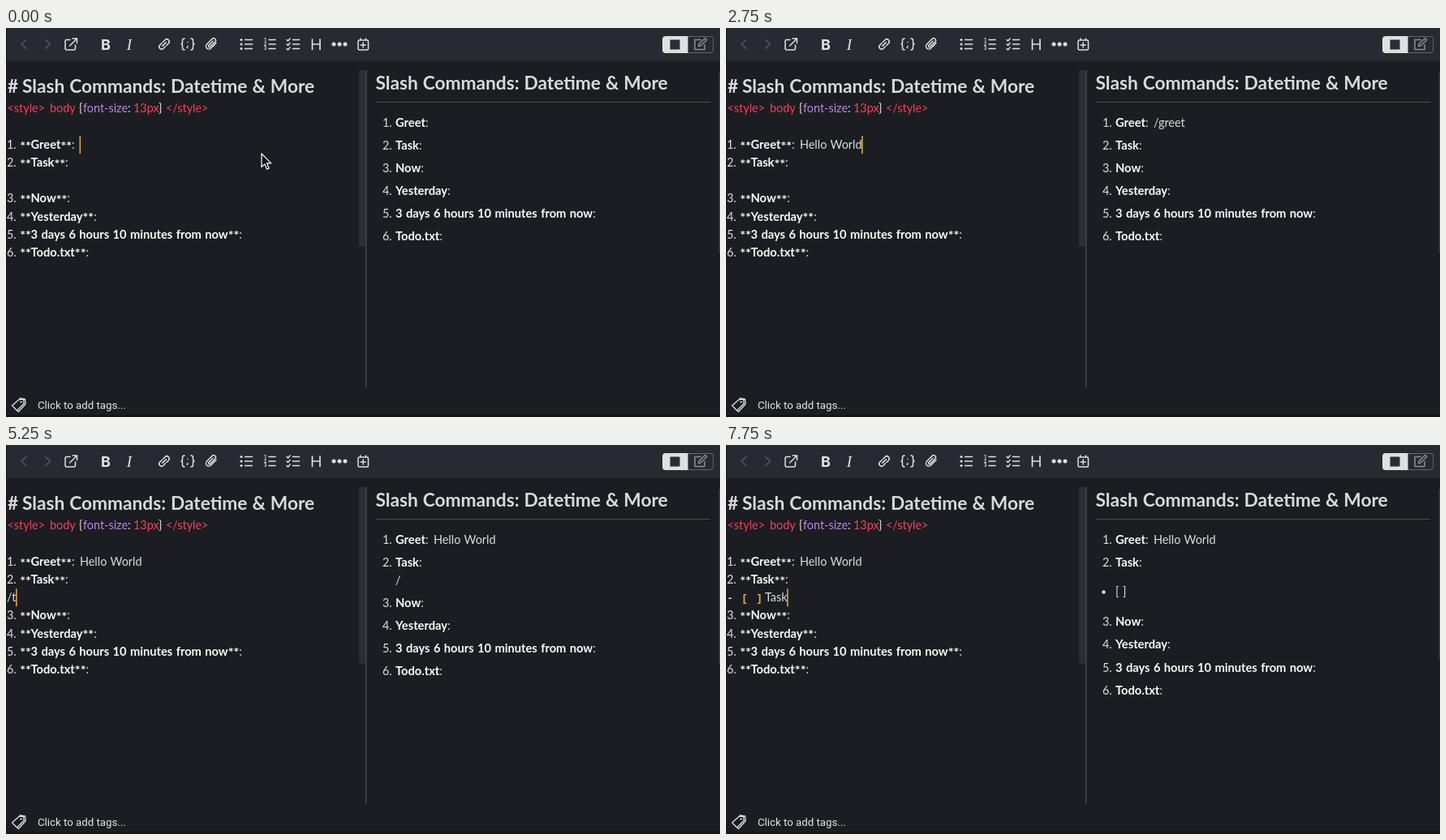
Recreate the animation shown at these times as an HTML page. Size 880 by 480 pixels, loop 8000 ms.

```html
<!DOCTYPE html>
<html lang="en">
<head>
<meta charset="utf-8">
<title>Slash commands</title>
<style>
  html, body { margin: 0; width: 100%; height: 100%; overflow: hidden; background: #1c1d22; }
  svg { display: block; width: 880px; height: 480px; }
  text { font: 14.4px Lato, sans-serif; fill: #dcdde0; word-spacing: .8px; white-space: pre; }
  .b { font-size: 14.7px; font-weight: 700; fill: #fafafb; }
  .star { font-size: 16px; }
  .h { font-size: 22.7px; font-weight: 700; fill: #d9dadc; word-spacing: .5px; }
  .red { fill: #f43f5e; }
  .purple { fill: #b48be0; }
  .mono { font: 700 16px "Liberation Mono", monospace; word-spacing: 0; }
  .small { font-size: 12.5px; letter-spacing: 1.5px; }
  .amber { fill: #eab04c; }
  .ui { font: 13.25px Roboto, sans-serif; fill: #e6e6e8; word-spacing: 0; }
  .icons { fill: none; stroke: #dfe0e2; stroke-width: 1.5; stroke-linecap: round; stroke-linejoin: round; }
  .icons text { fill: #e4e5e7; stroke: none; text-anchor: middle; }
  .solid { fill: #dfe0e2; stroke: none; }
</style>
</head>
<body>
<svg viewBox="0 0 880 480">
  <rect width="880" height="480" fill="#1c1d22"/>
  <rect width="880" height="41" fill="#272a30"/>
  <rect y="477" width="880" height="3" fill="#181319"/>
  <rect width="1" height="480" fill="#17151b"/>
  <rect x="435" y="52" width="8" height="218" rx="2" fill="#2d2e33"/>
  <path d="M443.8 52V443" stroke="#4c4d51" stroke-width="1.3"/>
  <path d="M456 91.5H868" stroke="#4a4b4f"/>
  <rect id="bar" x="878.5" y="55" width="1.5" fill="#36373c"/>

  <g class="icons">
    <path stroke="#54575d" d="M25 14.5l-6 5.5 6 5.5M48.5 14.5l6 5.5-6 5.5"/>
    <path d="M79 14.5h-4q-2 0-2 2v8.500q0 2 2 2h8.500q2 0 2-2v-4M82 13h5.500v5.500M87 13.500l-8.500 8.500"/>
    <text x="123" y="26.5" style="font:700 18px Inter,sans-serif">B</text>
    <text x="152" y="26.5" style="font:italic 19px 'Liberation Serif',serif">I</text>
    <path transform="translate(195 20) rotate(-45)" d="M-1 3h-3.500a3 3 0 0 1 0-6h3.500M1-3h3.500a3 3 0 0 1 0 6h-3.500M-3 0h6"/>
    <path d="M220 13q-2.500 0-2.500 2.500v2q0 2.500-1.500 2.500 1.500 0 1.500 2.500v2q0 2.500 2.500 2.500M228 13q2.500 0 2.500 2.500v2q0 2.500 1.500 2.500-1.500 0-1.500 2.500v2q0 2.500-2.500 2.500M224 17.500v.1M224 22.500l-.8 2"/>
    <path d="M259 18.500l-6.500 6.500a3.400 3.400 0 0 1-5-5l6.500-6.500a2.500 2.500 0 0 1 3.700 3.700l-6 6a1.200 1.200 0 0 1-1.800-1.800l5.200-5.200"/>
    <path d="M294.500 14.500h9M294.500 20h9M294.500 25.500h9M324 14.500h8M324 20h8M324 25.500h8M353.500 14.500h8M353.500 20h8M353.500 25.500h8M346 14.500l1.500 1.500 2.500-3M346 20l1.500 1.500 2.500-3M346 25.500l1.500 1.500 2.500-3"/>
    <g class="solid">
      <circle cx="290" cy="14.5" r="1.5"/><circle cx="290" cy="20" r="1.5"/><circle cx="290" cy="25.5" r="1.5"/>
      <circle cx="404" cy="20" r="2.5"/><circle cx="411" cy="20" r="2.5"/><circle cx="418" cy="20" r="2.5"/>
    </g>
    <g id="digits"></g>
    <path stroke-width="1.7" d="M377.500 14v12.500M387 14v12.500M377.500 20h9.500"/>
    <path d="M435.500 15h9.500q1.500 0 1.500 1.500v9q0 1.500-1.500 1.500h-9.500q-1.500 0-1.500-1.500v-9q0-1.500 1.500-1.500zM437 13v2M443.500 13v2M440.200 18v6M437.200 21h6"/>
    <rect x="809.7" y="10.5" width="62" height="20" rx="3.5" stroke="#63666b" stroke-width="1"/>
    <path class="solid" d="M813 10h27.500v21H813q-4 0-4-4V14q0-4 4-4z"/>
    <rect x="818.5" y="14.5" width="12" height="12" fill="#2b2d32" stroke="none"/>
    <path stroke="#8b8e93" d="M856 14.500h-7v12h12v-6M853.500 22.500l.7-3 7.500-7 2 2-7.500 7.200z"/>
    <path stroke-width="1.3" d="M7.500 466l8.500-7.500 5.500-.500.500 5.500-8.500 8.500zM17 457l6.500 1 .500 6-8.500 9.500-2-1.500"/>
    <circle cx="18.5" cy="461.5" r=".8" stroke-width="1"/>
  </g>

  <text class="ui" x="39" y="470">Click to add tags...</text>
  <text class="h" x="2" y="80">#<tspan x="20">Slash Commands: Datetime &amp; More</tspan></text>
  <text class="h" x="455.5" y="75.5">Slash Commands: Datetime &amp; More</text>
  <text y="104"><tspan class="red" x="1.5">&lt;style&gt;</tspan><tspan class="red" x="54">body</tspan><tspan x="90">{</tspan><tspan class="purple" x="95">font-size</tspan><tspan>:</tspan><tspan class="red" x="157">13px</tspan><tspan x="188">}</tspan><tspan class="red" x="197">&lt;/style&gt;</tspan></text>

  <g id="editor"></g>
  <text id="greet" x="91" y="149"></text>
  <text id="cmd" x="1" y="193.3"></text>
  <g id="box">
    <text class="mono small" x="1.2" y="193">- <tspan class="amber">[ ]</tspan></text>
    <text id="task" x="48" y="193.3"></text>
  </g>

  <g id="top"></g>
  <g id="rest"></g>
  <text id="out1" x="527" y="122"></text>
  <text id="out2" x="480" y="172"></text>
  <g id="item"><circle cx="465.5" cy="181.5" r="2.2" fill="#dcdde0"/><text x="480" y="186">[ ]</text></g>

  <rect id="caret" width="1.6" height="22" fill="#dca238"/>
  <g id="popup">
    <rect id="frame" width="111" height="31" rx="4" fill="#f3f4f6"/>
    <rect id="pick" x="4" y="4" width="103" height="24" rx="2" fill="#0a7cff"/>
    <text x="13.5" y="20.5" text-anchor="middle" style="font:700 16px 'Liberation Serif',serif;fill:#e4f0ff">T</text>
    <text id="choice" class="mono" x="37" y="21" style="fill:#fff"></text>
  </g>
  <path id="mouse" d="M315 155v16.500l3.900-3.600 2.700 6.300 2.600-1.100-2.700-6.200h5.200z" fill="#111" stroke="#fff" stroke-width="1.2" stroke-linejoin="round"/>
</svg>
<script>
const $ = id => document.getElementById(id);
const show = (id, on) => $(id).setAttribute('visibility', on ? 'visible' : 'hidden');
const set = (id, attrs) => { for (const k in attrs) $(id).setAttribute(k, attrs[k]); };

const names = ['Greet', 'Task', 'Now', 'Yesterday', '3 days 6 hours 10 minutes from now', 'Todo.txt'];
const previewY = [122, 150, 177.5, 205.5, 234, 262];
names.forEach((name, i) => {
  const y = 149 + 22.15 * (i < 2 ? i : i + 1);
  const stars = `<tspan class="b star" dy="1.5">**</tspan>`;
  $('editor').innerHTML += `<text x="1" y="${y}">${i + 1}.<tspan x="17.3">${stars}</tspan>` +
    `<tspan class="b" x="30.5" dy="-1.5">${name}</tspan>${stars}<tspan dy="-1.5">:</tspan></text>`;
  $(i < 2 ? 'top' : 'rest').innerHTML += `<text x="464" y="${previewY[i]}">${i + 1}.` +
    `<tspan class="b" x="480">${name}</tspan>:</text>`;
});
[1, 2, 3].forEach(n => {
  $('digits').innerHTML += `<text x="319.5" y="${11.5 + n * 5.3}" style="font:700 5.5px Inter,sans-serif">${n}</text>`;
});

// Each track lists [start ms, value]; a value holds until the next start.
const greet = [[0, ''], [750, '/'], [1500, '/g'], [1750, '/gre'], [2000, '/gree'], [2250, '/greet'], [2750, 'Hello World']];
const cmd = [[0, ''], [4500, '/'], [5250, '/t'], [5500, '/ta'], [5750, '/tas'], [6000, '/task'], [6250, '']];
const task = [[0, ''], [7000, 'T'], [7250, 'Ta'], [7500, 'Tas'], [7750, 'Task']];
const out1 = [[0, ''], [1250, '/'], [2750, '/greet'], [3250, 'Hello World']];
const out2 = [[0, ''], [5000, '/'], [6500, '/task'], [6750, '']];
const row = [[0, 0], [3250, 1], [3500, 2]];
const popup = [[0, ''], [2250, 'Hello World'], [2750, ''], [6000, '- [ ] '], [6250, '']];
const shift = [[0, 0], [5000, 22], [6750, 45.5]];
const caretOn = [[0, 1], [500, 0], [750, 1], [1250, 0], [1500, 1], [4000, 0], [4500, 1], [5000, 0], [5250, 1], [6750, 0], [7000, 1]];

const at = (track, t) => track.reduce((v, [start, next]) => t >= start ? next : v, null);
const endOf = id => +$(id).getAttribute('x') + $(id).getComputedTextLength();

function draw(t) {
  const tracks = { greet, cmd, task, out1, out2 };
  for (const id in tracks) $(id).textContent = at(tracks[id], t);

  const boxed = t >= 6250, line = at(row, t), choice = at(popup, t), dy = at(shift, t);
  show('mouse', t < 250);
  show('box', boxed);
  show('item', t >= 6750);
  set('rest', { transform: `translate(0 ${dy})` });
  set('bar', { height: 222 - dy * .29 });

  const x = line === 0 ? endOf('greet') : line === 1 ? 76 : endOf(boxed ? 'task' : 'cmd');
  set('caret', { x: x - .5, y: 133 + line * 22.15 });
  show('caret', at(caretOn, t));

  show('popup', choice);
  if (choice) {
    const width = 53 + choice.length * 9.65;
    $('choice').textContent = choice;
    set('frame', { width });
    set('pick', { width: width - 8 });
    set('popup', { transform: line ? 'translate(.5 199.5)' : 'translate(90 155.5)' });
  }
}

function tick() {
  draw(performance.now() % 8000);
  requestAnimationFrame(tick);
}
tick();
</script>
</body>
</html>
```
